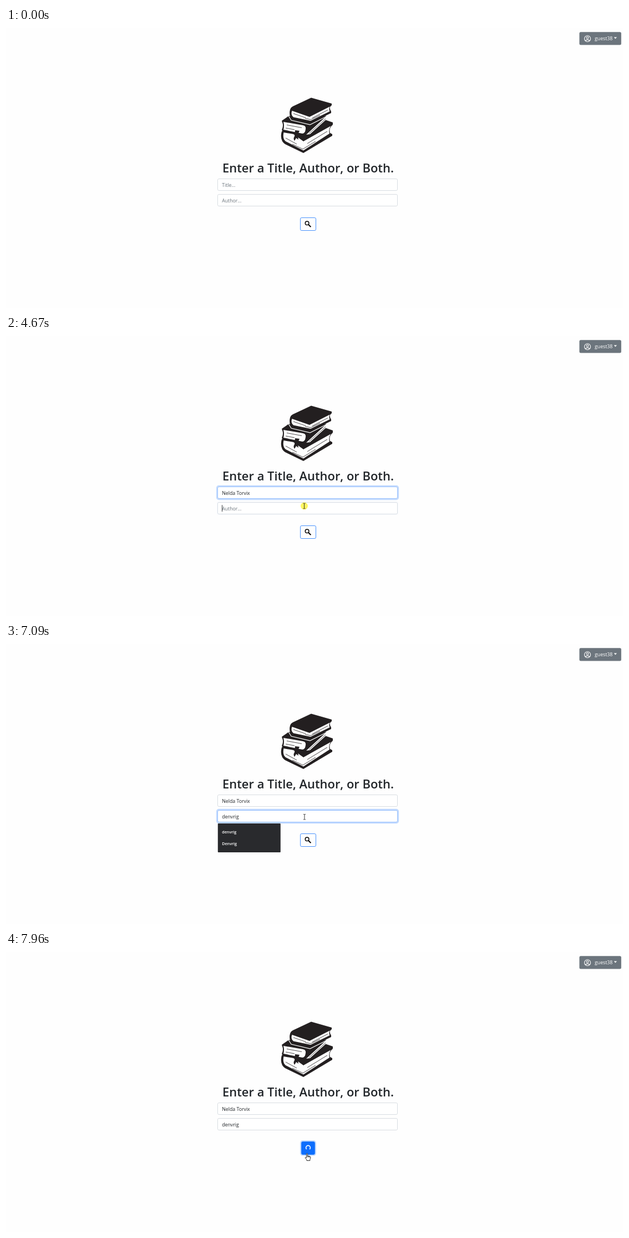
An HTML page that plays this animation: 1112x504 px, repeating every 8000 ms.

```html
<!DOCTYPE html>
<html lang="en">
<head>
<meta charset="utf-8">
<title>Book search</title>
<style>
  html, body { margin: 0; width: 100%; height: 100%; overflow: hidden; background: #fefefe; }
  svg { display: block; width: 1112px; height: 504px; }
  text { font: 8.75px "Open Sans", "Noto Sans", sans-serif; fill: #212529; white-space: pre; }
  .heading { font-size: 21.95px; font-weight: 600; text-anchor: middle; }
  .hint { fill: #6c757d; }
  .box { fill: #fff; stroke: #d8dde2; }
  .edge { fill: none; stroke: #98c1fe; }
  .ring { fill: none; stroke: #0d6efd; stroke-opacity: .25; stroke-width: 2.3; }
  .list text { font-size: 7.2px; font-weight: 600; fill: #fff; }
  .dark { fill: #231f20; }
  .page { fill: #fefefe; }
  .ink { fill: none; stroke: #231f20; stroke-width: .8; }
  .gap { fill: none; stroke: #fefefe; stroke-width: 1.2; }
</style>
</head>
<body>
<svg viewBox="0 0 1112 504">
  <!-- account button -->
  <rect x="1033.400" y="7.200" width="75.400" height="23.200" rx="2.500" fill="#6c757d"/>
  <g fill="none" stroke="#fff" stroke-width="1.100">
    <circle cx="1048" cy="19.200" r="5.500"/>
    <circle cx="1048" cy="17.600" r="1.900"/>
    <path d="M1044 23Q1048 19.300 1052 23"/>
  </g>
  <text x="1061" y="21.600" style="fill:#fff">guest38</text>
  <path d="M1095.600 16.600h5.400l-2.700 2.800z" fill="#fff"/>

  <!-- stack of books: bottom, middle, top -->
  <path class="dark" d="M497 186Q494 196 498 204Q500 207 503 209L536 225L588 194V191L584 189Q582 182 586 177L589 174V170L560 160L520 180L500 184Z"/>
  <path class="page" d="M500.500 188L518 191L536 204L585 176.500Q581 183 583 190L536 220.500L504 204Q498 199 500.500 188Z"/>
  <path class="ink" d="M504 198L524 209M516 209L535 218L558 204M543 208L579 186"/>
  <path class="dark" d="M497 167L510 158L545 166L577 158L570 170L540 193L499 186Q496 184 498 181Q500 175 498 170Z"/>
  <path class="page" d="M500 169L535 175Q541 176 540 182Q539 190 534 190L500 183Q502 176 500 169Z"/>
  <path class="ink" d="M506 174.500L533 179.500M504 180L520 183"/>
  <path class="page" d="M541 192L576 160L579 163L548 191Z"/>
  <path class="ink" d="M546 190L576 163.500"/>
  <path class="gap" d="M509 158L514 166L548 174L578 159"/>
  <path class="dark" d="M521 184L529 185Q525 192 527 201L523 198L520 203Q517 199 520 195Z"/>
  <path class="dark" d="M550 125.500L587 136V139L584 142Q583 146 586 150V153L549 171L515 164Q509 156 512 147Q513 143 517 141Z"/>
  <path class="page" d="M515.500 149L547 160L583.500 141.500Q581.500 146 583.500 150L549 167L518 160.500Q512.500 156 515.500 149Z"/>
  <path class="ink" d="M518 154L540 161.500M552 162L580 147.500M539 162.500L549 165L566 157"/>

  <text class="heading" x="544.500" y="260">Enter a Title, Author, or Both.</text>

  <g id="fields"></g>

  <!-- search button -->
  <rect id="btnRing" class="ring" x="531.200" y="340.200" width="26.600" height="25.400" rx="3.500"/>
  <rect id="btn" x="530.500" y="341.500" width="28" height="23" rx="2.300" stroke="#0d6efd" stroke-opacity=".75" fill="#0d6efd"/>
  <g id="lens" fill="none" stroke="#000">
    <circle cx="542.600" cy="351.300" r="3.300" stroke-width="1.500"/>
    <path d="M545 353.700L549.400 358.100" stroke-width="2"/>
  </g>
  <circle id="spin" cx="544.500" cy="352.300" r="3.900" fill="none" stroke="#fff" stroke-width="1.600"
    pathLength="100" stroke-dasharray="75 25" stroke-dashoffset="-37.500"/>

  <g id="list" class="list"></g>

  <!-- pointer -->
  <circle id="glow" r="6.500" fill="#fff000" fill-opacity=".62"/>
  <g id="pointer">
    <path id="beam" d="M-2 -4.700H-.6L0 -4.200L.6 -4.700H2M0 -4.200V4.200M-2 4.700H-.6L0 4.200L.6 4.700H2" fill="none" stroke="#222" stroke-width=".9"/>
    <path id="arrow" d="M0 0V9.700L2.200 7.700L3.600 11L5.100 10.300L3.700 7.200H6.800Z" fill="#fff" stroke="#000" stroke-width=".7"/>
    <path id="hand" d="M-1 1Q0 -.4 1 1V5L5.500 6Q6.500 6.400 6.400 8L5.300 11.500V13.500H-.5V12L-3.300 8.500Q-3.300 6.800 -1 8.300ZM1 5V7.500M2.800 5.500V7.600M4.500 5.900V7.800" fill="#fff" stroke="#000" stroke-width=".8"/>
  </g>
</svg>
<script>
const $ = id => document.getElementById(id);
const set = (el, attrs) => { for (const k in attrs) el.setAttribute(k, attrs[k]); };
const show = (el, on) => set(el, { visibility: on ? 'visible' : 'hidden' });
const ramp = (t, a, b) => Math.min(1, Math.max(0, (t - a) / (b - a)));
const smooth = u => u * u * (3 - 2 * u);
const easeOut = u => 1 - (1 - u) ** 2;

const LOOP = 8000, ROW = 21, BLINK = 500;
const CLICKS = [[730, 930], [4650, 4820], [7500, 7650]];
const BLUR = 7560, LOAD = 7680;

// keys: time at which each character of the value appears
const fields = [
  { y: 271.5, hint: 'Title...', value: 'Nelda Torvix', on: 730, off: 4665, caret: [880, 1390],
    keys: [1640, 1870, 2090, 2230, 2370, 2480, 2830, 3080, 3230, 3350, 3600, 3810] },
  { y: 299.5, hint: 'Author...', value: 'denvrig', on: 4665, off: BLUR, caret: [4665, 5300],
    keys: [5580, 5670, 5770, 6150, 6150, 6370, 6470] }
];
const names = ['denvrig', 'Denvrig', 'devnrig', 'marlo', 'oskell', 'tavish b'];

for (const f of fields) {
  const g = document.createElementNS('http://www.w3.org/2000/svg', 'g');
  g.innerHTML = `<rect class="ring" x="380" y="${f.y - 1.5}" width="327" height="24" rx="3.5"/>
    <rect class="box" x="381.5" y="${f.y}" width="324" height="21" rx="2.3"/>
    <rect class="edge" x="381.5" y="${f.y}" width="324" height="21" rx="2.3"/>
    <text x="389.2" y="${f.y + 14}"></text>
    <rect y="${f.y + 4.7}" width=".9" height="12" fill="#212529"/>`;
  $('fields').append(g);
  [f.ring, , f.edge, f.text, f.bar] = g.children;
}
$('list').innerHTML = '<rect x="381.2" y="322.5" width="113" rx="1" fill="#292a2d"/>' +
  names.map((n, i) => `<text x="388.6" y="${340.7 + i * ROW}">${n}</text>`).join('');
const [panel, ...rows] = $('list').children;

function drawField(f, t) {
  const focus = ramp(t, f.on, f.on + 150) - ramp(t, f.off, f.off + 150);
  set(f.ring, { opacity: focus });
  set(f.edge, { opacity: focus });
  const n = f.keys.filter(k => k <= t).length;
  f.text.textContent = n ? f.value.slice(0, n) : f.hint;
  f.text.setAttribute('class', n ? '' : 'hint');
  const [from, to] = n ? [f.keys[n - 1], f.keys[n - 1] + BLINK] : f.caret;
  show(f.bar, t >= from && t < to && t < f.off);
  set(f.bar, { x: 389 + (n ? f.text.getComputedTextLength() : 0) });
}

function drawList(t) {
  const n = t < 4800 ? 0 : t < 5580 ? 6 : t < 6370 ? 3 : 2;
  show(panel, n);
  set(panel, { height: n === 2 ? 52 : n * ROW + 13 });
  rows.forEach((r, i) => show(r, i < n));
  set($('list'), {
    opacity: 1 - ramp(t, 7535, 7740),
    transform: n === 2 ? 'translate(.6 .5)' : ''
  });
}

function drawPointer(t) {
  const a = smooth(ramp(t, 50, 570)), b = easeOut(ramp(t, 3990, 4390)), c = smooth(ramp(t, 7000, 7480));
  const x = 1044 - 523.5 * a + 17 * b + 5 * c;
  const y = 477 - 195 * a + 24 * b + 56 * c;
  const inside = (l, top, w, h) => x >= l && x <= l + w && y >= top && y <= top + h;
  const beam = fields.some(f => inside(381, f.y, 325, 22)), hand = inside(530, 341, 29, 23.5);
  const on = t >= 50;
  set($('pointer'), { transform: `translate(${x} ${y})` });
  show($('beam'), on && beam);
  show($('hand'), on && hand);
  show($('arrow'), on && !beam && !hand);
  set($('glow'), { cx: x, cy: y });
  show($('glow'), CLICKS.some(([p, q]) => t >= p && t < q));
}

function drawButton(t) {
  const busy = t >= LOAD;
  set($('btn'), {
    'fill-opacity': ramp(t, 7280, 7430),
    x: busy ? 532.5 : 530.5,
    width: busy ? 24 : 28
  });
  set($('btnRing'), { opacity: ramp(t, 7640, 7780) });
  show($('lens'), !busy);
  show($('spin'), busy);
  set($('spin'), { transform: `rotate(${(t - 7960) / 750 * 360} 544.5 352.3)` });
}

function frame() {
  const t = performance.now() % LOOP;
  fields.forEach(f => drawField(f, t));
  drawList(t);
  drawButton(t);
  drawPointer(t);
  requestAnimationFrame(frame);
}
frame();
</script>
</body>
</html>
```
